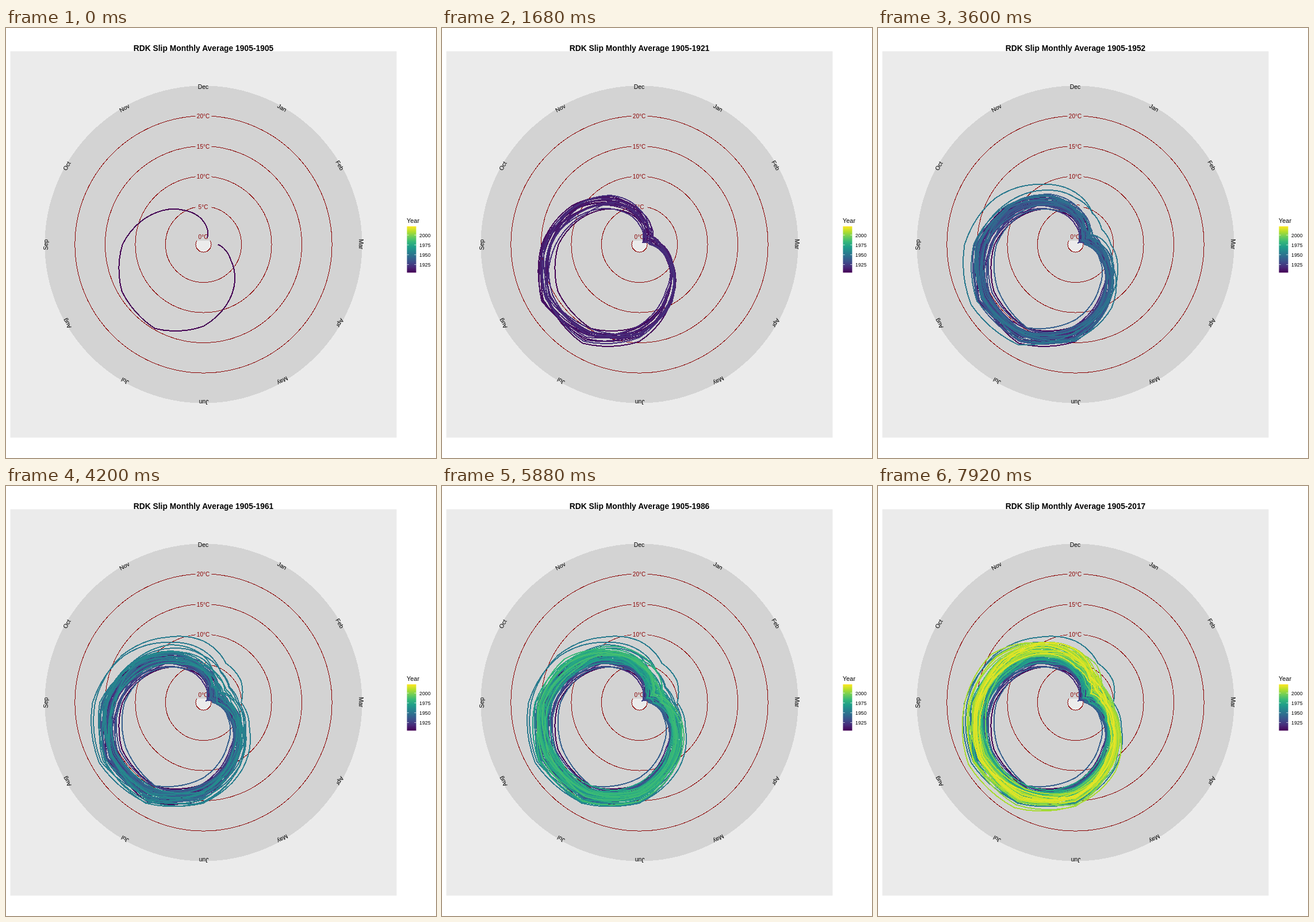
Animation of 748x748 px, one loop 8 s. Source, as an HTML page:

```html
<!DOCTYPE html>
<html lang="en">
<head>
<meta charset="utf-8">
<title>Monthly temperature spiral</title>
<style>
  html, body { margin: 0; width: 100%; height: 100%; overflow: hidden; background: #fff; }
  svg { display: block; width: 748px; height: 748px; font-family: "Liberation Sans", Arial, sans-serif; }
  .crisp { shape-rendering: crispEdges; }
  .mid { text-anchor: middle; }
  .year { fill: none; stroke-width: 2; stroke-linejoin: round; }
</style>
</head>
<body>
<svg id="chart" viewBox="0 0 748 748"></svg>
<script>
const CX = 343.5, CY = 376.5;
const LOOP = 8000, HOLD = 720, STEP = 120, YEARS_PER_STEP = 1.8;
const FIRST = 1905, LAST_INDEX = 110, GAP_INDEX = 44, GAP_YEARS = 2;
const MONTHS = 'Jan Feb Mar Apr May Jun Jul Aug Sep Oct Nov Dec'.split(' ');
const VIRIDIS = ['#440154', '#482878', '#3e4a89', '#31688e', '#26828e', '#1f9e89', '#35b779', '#6ece58', '#b5de2b', '#fde725'];

// Unusually cold or warm spells: when, and by how many degrees.
const SPELLS = [[1905.65, -1.9], [1937.5, 1.6], [1940.55, -2.8], [1952.8, 1.9],
  [1953.9, 2.6], [2002.7, 1.6], [2006.6, 3]];

const svg = document.getElementById('chart');
const radius = temp => 13.6 + 10.5 * temp;
const yearAt = i => FIRST + i + (i >= GAP_INDEX ? GAP_YEARS : 0);
const wave = (month, peak, cycles = 1) => Math.cos((month - peak) * cycles * Math.PI / 6);
const bump = (time, centre, width) => Math.exp(-(((time - centre) / width) ** 2));
const clamp = (v, low, high) => Math.max(low, Math.min(high, v));

function add(tag, attrs, text = '', parent = svg) {
  const el = document.createElementNS('http://www.w3.org/2000/svg', tag);
  for (const key in attrs) el.setAttribute(key, attrs[key]);
  el.textContent = text;
  parent.appendChild(el);
  return el;
}

function polar(month, r) {
  const a = month * Math.PI / 6;
  return (CX + r * Math.sin(a)).toFixed(1) + ',' + (CY - r * Math.cos(a)).toFixed(1);
}

function yearColor(year) {
  const p = (year - FIRST) / 116 * 9, i = Math.min(8, Math.floor(p));
  const channel = (hex, n) => parseInt(hex.slice(1 + 2 * n, 3 + 2 * n), 16);
  const mix = [0, 1, 2].map(n => {
    const a = channel(VIRIDIS[i], n);
    return Math.round(a + (channel(VIRIDIS[i + 1], n) - a) * (p - i));
  });
  return `rgb(${mix})`;
}

let seed = 1977;
function random() {
  seed = (seed * 1664525 + 1013904223) % 4294967296;
  return seed / 4294967296;
}
const bell = () => (random() + random() + random() - 1.5) * 2;

// Long-term rise with two warm periods; 0 is cool, 1 is warm.
function warmth(time) {
  return 1.05 / (1 + Math.exp((1975 - time) / 12)) + 0.8 * bump(time, 1953, 5) + 0.15 * bump(time, 2007, 6);
}

// Seasonal curve, warming that favours winter, spells, and drifting noise.
function monthlyTemps() {
  const temps = [];
  let noise = 0;
  for (let i = 0; i < (LAST_INDEX + 2) * 12; i++) {
    const month = i % 12, time = yearAt(Math.floor(i / 12)) + month / 12;
    const season = 8 + 8 * wave(month, 6.74) + 0.6 * wave(month, -0.15, 2);
    const warming = warmth(time) * (1.7 + 1.2 * wave(month, 0.3));
    const spell = SPELLS.reduce((sum, [when, size]) => sum + size * bump(time, when, 0.35), 0);
    noise = clamp(0.6 * noise + 0.6 * bell(), -1.6, 1.6);
    temps.push(Math.max(-1.2, season + warming + spell + noise * Math.min(1, i / 24)));
  }
  return temps;
}

function spiralPath(temps, from, to) {
  const points = [];
  for (let m = from; m <= to; m += 1 / 6) {
    const i = Math.floor(m + 1e-6), f = m - i;
    points.push(polar(m + 1, radius(temps[i] + (temps[i + 1] - temps[i]) * f)));
  }
  points.push(polar(to + 1, radius(temps[to])));
  return 'M' + points.join('L');
}

function drawDial() {
  add('rect', { x: 7.5, y: 40.5, width: 672, height: 672, fill: '#ebebeb' });
  add('circle', { cx: CX, cy: CY, r: radius(25), fill: '#d3d3d3', class: 'crisp' });
  const hole = MONTHS.map((_, i) => polar(i, radius(0))).join(' ');
  add('polygon', { points: hole, fill: '#ebebeb', stroke: '#8b0000', class: 'crisp' });
  for (let t = 0; t <= 20; t += 5) {
    const y = CY - radius(t) + 1;
    if (t) add('circle', { cx: CX, cy: CY, r: radius(t), fill: 'none', stroke: '#8b0000', class: 'crisp' });
    add('rect', { x: CX - 14, y: y - 7, width: 28, height: 13, fill: '#d3d3d3' });
    add('text', { x: CX - 0.5, y: y + 3.5, 'font-size': 10, fill: '#8b0000', class: 'mid' }, t + '°C');
  }
}

function drawMonths() {
  MONTHS.forEach((name, i) => add('text', {
    x: CX - 0.5, y: CY - 270.5, 'font-size': 10.4, class: 'mid',
    transform: `rotate(${30 * (i + 1)} ${CX} ${CY})`
  }, name));
}

function drawLegend() {
  const ramp = add('linearGradient', { id: 'ramp', x1: 0, y1: 1, x2: 0, y2: 0 });
  VIRIDIS.forEach((c, i) => add('stop', { offset: i / 9, 'stop-color': c }, '', ramp));
  add('text', { x: 697, y: 339, 'font-size': 10.9 }, 'Year');
  add('rect', { x: 697.5, y: 345, width: 16, height: 80.5, fill: 'url(#ramp)' });
  for (let year = 1925; year <= 2000; year += 25) {
    const y = 411.5 - (year - 1925) * 0.684;
    add('path', { d: `M697.5 ${y}h3.2M710.3 ${y}h3.2`, stroke: '#fff', 'stroke-width': 0.7 });
    add('text', { x: 719, y: y + 3.4, 'font-size': 8.8 }, year);
  }
}

function drawYears() {
  const temps = monthlyTemps(), paths = [];
  for (let i = 0; i <= LAST_INDEX; i++) {
    paths.push(add('path', {
      d: spiralPath(temps, i ? i * 12 : 2, i * 12 + 12),
      stroke: yearColor(yearAt(i)), class: 'year crisp'
    }));
  }
  return paths;
}

drawDial();
const paths = drawYears();
drawMonths();
drawLegend();
const title = add('text', { x: CX, y: 40, 'font-size': 13.85, 'font-weight': 'bold', class: 'mid' });

let shown = -1;
const start = performance.now();
function render() {
  const t = (performance.now() - start) % LOOP;
  const step = t < HOLD ? 0 : Math.floor((t - HOLD) / STEP) + 1;
  const index = Math.min(LAST_INDEX, Math.floor(YEARS_PER_STEP * step + 0.3));
  if (index !== shown) {
    shown = index;
    paths.forEach((p, i) => { p.style.display = i <= index ? '' : 'none'; });
    title.textContent = `RDK Slip Monthly Average ${FIRST}-${yearAt(index)}`;
  }
  requestAnimationFrame(render);
}
render();
</script>
</body>
</html>
```
